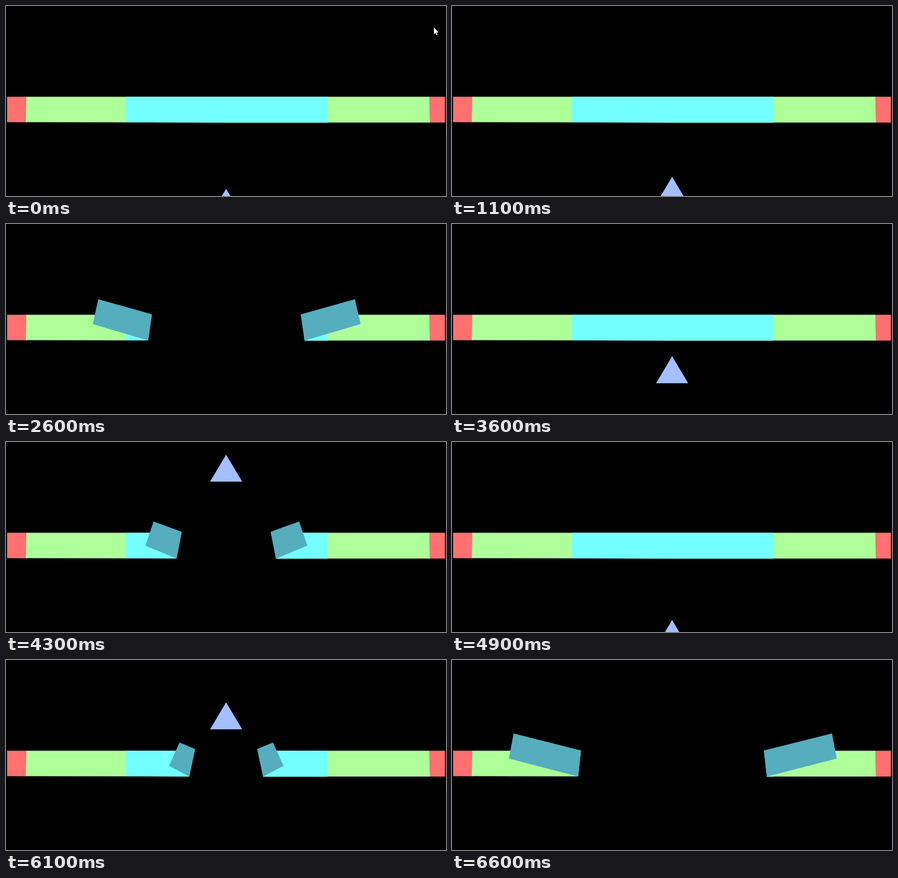
An HTML page that plays this animation: 800 px wide and 346 px high, repeating every 6.7 s.

```html
<!DOCTYPE html>
<html lang="en">
<head>
<meta charset="utf-8">
<title>Splitting bar</title>
<style>
html, body { margin: 0; width: 100%; height: 100%; overflow: hidden; background: #000; }
svg { display: block; width: 100vw; height: 100vh; }
</style>
</head>
<body>
<svg viewBox="0 0 800 346" preserveAspectRatio="none">
  <rect width="800" height="346" fill="#000"/>
  <path fill="#ff7070" d="M2 165.3H38V211.7L2 211.5ZM768 165.3H798V212.3H768Z"/>
  <path fill="#aeff9a" d="M37 165.3H769.5L770.5 212.3L400 212.2L36 211.6Z"/>
  <path fill="#73ffff" d="M218 165.3H584.4V212.4L400 212.4L218 212Z"/>
  <path id="gap" fill="#000"/>
  <path id="left" fill="#55adbe"/>
  <path id="right" fill="#55adbe"/>
  <path id="wedge" fill="#a3bfff"/>
  <path id="cursor" fill="#fff" d="M778 39V51.5L780.8 49L782.8 53.2L784.4 52.4L782.5 48.2H786.5Z"/>
</svg>
<script>
const LOOP = 6700, STEP = 100, HOLD = 900, CYCLE = 1960;
const CONTACT = 900;      // phase at which the wedge meets the bar
const MID = 400, TOP = 165, BOTTOM = 212.3, THICK = 46.5;

const el = id => document.getElementById(id);
const poly = pts => "M" + pts.map(p => p.join(" ")).join("L") + "Z";
const show = (id, on) => el(id).style.display = on ? "" : "none";

// Slow approach with a late spurt, then constant speed through the bar.
function apexAt(u) {
  const s = u / CONTACT;
  return s < 1 ? 333 - 99 * s - 29 * s ** 5 : 205 - 0.337 * (u - CONTACT);
}

// Distance from the middle to the fold, speeding up towards the end.
function foldAt(u) {
  const s = (u - CONTACT) / 880;
  return s > 0 ? Math.min(190, 130 * s + 35.5 * s ** 8) : 0;
}

// Corners of the left flap for a fold at distance d: the wider it opens,
// the longer and flatter the flap lies.
function flap(d) {
  const tilt = Math.min(1.3, 5.48 / d ** 0.6);
  const len = Math.max(0, 0.81 * d - 4);
  const hingeTop = [MID - d, TOP - Math.min(3, 1e4 / d ** 2)];
  const hingeLow = [MID - d - Math.min(d, 13.5 - 0.05 * d), BOTTOM];
  const tipLow = [hingeLow[0] - len * Math.cos(tilt), BOTTOM - len * Math.sin(tilt)];
  const lean = tilt - 0.07;
  const tipTop = [tipLow[0] + THICK * Math.sin(lean), tipLow[1] - THICK * Math.cos(lean)];
  return [hingeTop, tipTop, tipLow, hingeLow];
}

const mirror = ([x, y]) => [MID + (MID - x) * 1.01, y];

function draw(t) {
  const u = Math.max(0, t - HOLD) % CYCLE;
  const y = apexAt(u), d = foldAt(u);

  show("cursor", t < STEP);
  show("wedge", y > -25);
  el("wedge").setAttribute("d", poly([[400.2, y], [429.5, y + 49.3], [371, y + 49.3]]));

  for (const id of ["gap", "left", "right"]) show(id, d > 0);
  if (!d) return;

  const l = flap(d), r = l.map(mirror);
  const below = ([x]) => [x, BOTTOM + 4];
  el("left").setAttribute("d", poly(l));
  el("right").setAttribute("d", poly(r));
  el("gap").setAttribute("d", poly([l[0], r[0], r[3], below(r[3]), below(l[3]), l[3]]));
}

function frame() {
  const t = performance.now() % LOOP;
  draw(Math.floor(t / STEP) * STEP);
  requestAnimationFrame(frame);
}
frame();
</script>
</body>
</html>
```
